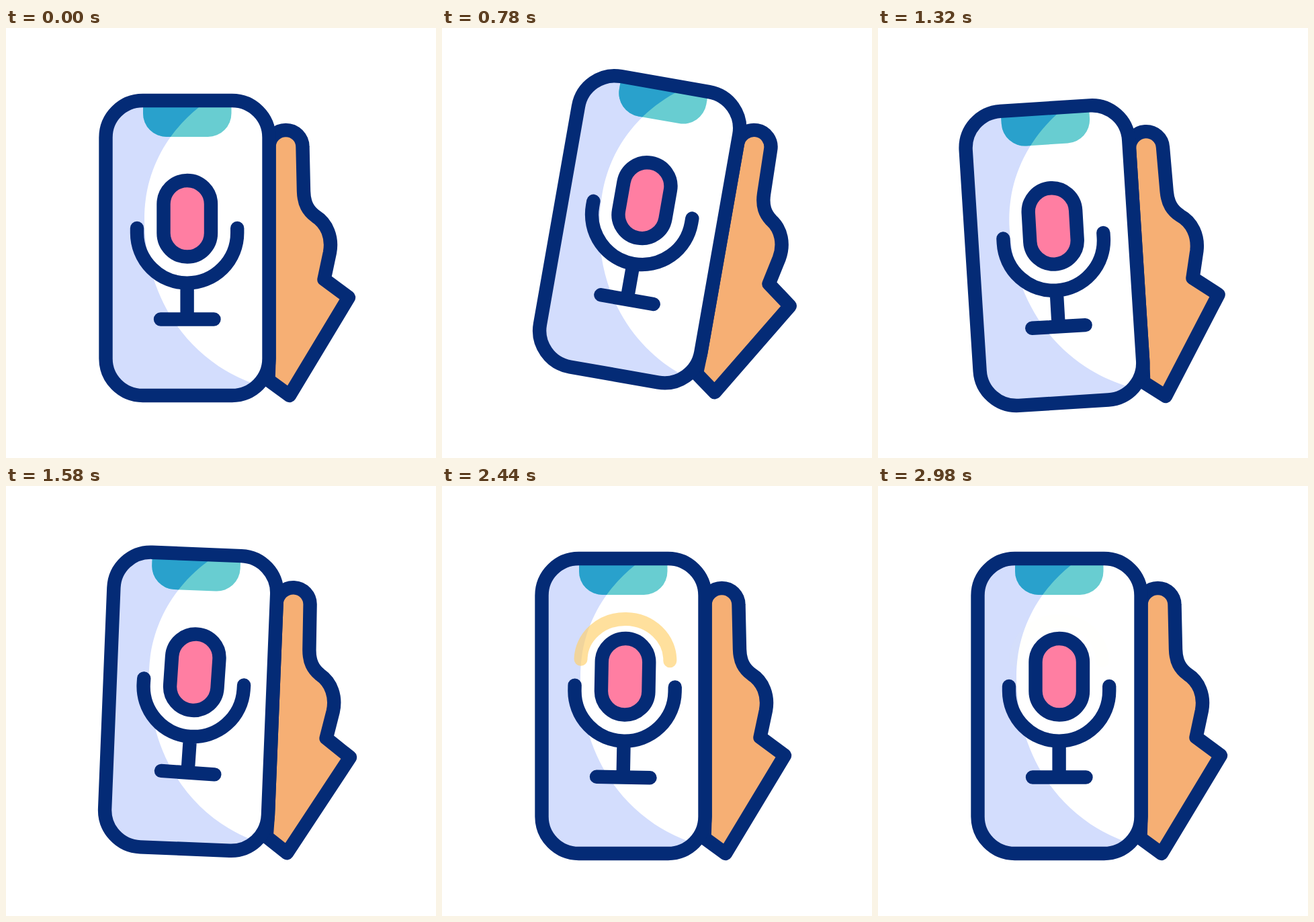
An HTML page that plays this animation: 640x640 px, repeating every 3120 ms.

```html
<!DOCTYPE html>
<html lang="en">
<head>
<meta charset="utf-8">
<title>Voice input</title>
<style>
html, body { margin: 0; width: 100%; height: 100%; overflow: hidden; background: #fff; }
svg { display: block; width: 100vw; height: 100vh; }
.line { fill: none; stroke: #042b76; stroke-width: 20.4; stroke-linecap: round; stroke-linejoin: round; }
.hand { fill: #f6af74; }
.head { fill: #ff7ea2; }
</style>
</head>
<body>
<svg viewBox="0 0 640 640">
  <defs>
    <clipPath id="screen"><rect x="148.5" y="108" width="243" height="439" rx="55"/></clipPath>
    <clipPath id="shade">
      <path id="shadow" d="M140 100H306L287 118C237 158 206 217 206 283C206 398 268 494 370 530L392 538V560H140Z"/>
    </clipPath>
    <path id="notch" d="M204 106V127A35 35 0 0 0 239 162H300.5A35 35 0 0 0 335.5 127V106Z"/>
  </defs>
  <g id="phone">
    <path class="line hand" d="M391.5 177A25 25 0 0 1 441.5 177L443 243C443.5 262 450 272 460.5 280C478 291 486 312 482 334L473.500 374L510 401L422 547L390.500 524L391.500 492Z"/>
    <g clip-path="url(#screen)">
      <rect x="140" y="100" width="260" height="455" fill="#fff"/>
      <use href="#shadow" fill="#d3ddfd"/>
      <use href="#notch" fill="#68cdd1"/>
      <use href="#notch" fill="#29a1cc" clip-path="url(#shade)"/>
    </g>
    <rect class="line" x="148.5" y="108" width="243" height="439" rx="55"/>
    <g id="mic">
      <path id="wave" fill="none" stroke="#ffd06b" stroke-width="20" stroke-linecap="round"/>
      <rect class="line head" x="234.500" y="227" width="70.500" height="113.500" rx="35.250"/>
      <path class="line" d="M195 298V305A74.600 74.600 0 0 0 344.200 305V298M269.600 380V433.500M230 433.500H309.500"/>
    </g>
  </g>
</svg>
<script>
const LOOP = 3120;
const MID = 269.6;
const phoneSwing = { start: 200, peak: 800, step: 410, count: 3, end: 1830, angle: 10, decay: 0.5 };
const micSwing = { start: 800, peak: 1100, step: 400, count: 4, end: 2600, angle: -2, decay: 1 };
const pulse = { start: 1960, period: 515, cycles: 2, fadeIn: 130, alpha: 0.85 };

const clamp = p => Math.min(1, Math.max(0, p));
const ease = p => clamp(p) ** 2 * (3 - 2 * clamp(p));
const $ = id => document.getElementById(id);

// Eases from rest through alternating, decaying peaks and back to rest.
function swing({ start, peak, step, count, end, angle, decay }, t) {
  const height = n => angle * (-decay) ** n;
  const last = peak + step * (count - 1);
  if (t < peak) return angle * ease((t - start) / (peak - start));
  if (t >= last) return height(count - 1) * (1 - ease((t - last) / (end - last)));
  const n = Math.floor((t - peak) / step);
  return height(n) + (height(n + 1) - height(n)) * ease((t - peak) / step - n);
}

function drawWave(t) {
  const { start, period, cycles, fadeIn, alpha } = pulse;
  const p = clamp((t - start) / (period * cycles));
  const rise = Math.sin(Math.PI * cycles * p) ** 2;
  const rx = 63.5 + 14 * Math.sqrt(rise);
  const ry = 0.92 * rx;
  const base = 201 - 73 * rise + ry;
  $("wave").setAttribute("d", `M${MID - rx} ${base}a${rx} ${ry} 0 0 1 ${2 * rx} 0`);
  $("wave").setAttribute("opacity", alpha * ease((t - start) / fadeIn + 1) * (1 - p * p));
}

function draw(t) {
  $("phone").setAttribute("transform", `rotate(${swing(phoneSwing, t)} 441 452)`);
  $("mic").setAttribute("transform", `rotate(${swing(micSwing, t)} ${MID} 433.5)`);
  drawWave(t);
}

const origin = performance.now();
function tick() {
  draw((performance.now() - origin) % LOOP);
  requestAnimationFrame(tick);
}
tick();
</script>
</body>
</html>
```
